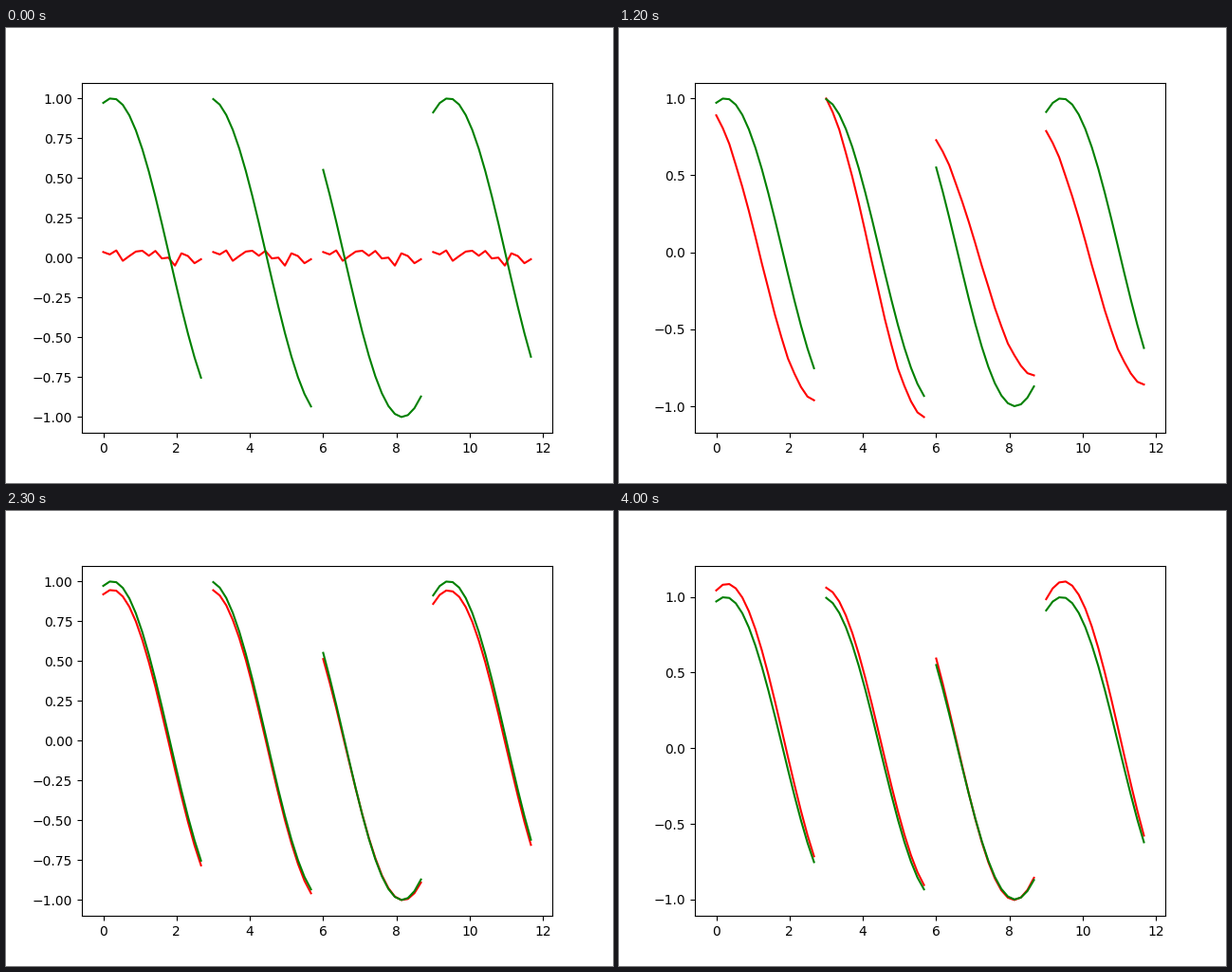
Animation, 640 px wide and 480 px high, one loop 4100 ms. Source, as a matplotlib script:

```python
import numpy as np
import matplotlib.pyplot as plt
from matplotlib.animation import FuncAnimation

FRAMES, INTERVAL = 41, 100
SPAN, POINTS = 8 / 3, 16

u = np.linspace(0, SPAN, POINTS)
starts = [0, 3, 6, 9]
phases = [-0.243, 0.107, 0.988, -0.425]

# Output of the untrained model: the same small noise in every window.
noise = np.array([.035, .02, .045, -.02, .01, .038, .043, .012,
                  .042, -.005, 0, -.05, .027, .01, -.035, -.01])

# Key points of the training: the slope of the wave is learnt first,
# its bow second; dip and lift are errors that fade out.
key_steps = [0, 4, 12, 15, 20, 27, 34, 40]
slope_keys = [1.08, 1.08, 1.07, 1.12, 1.035, .92, 1.0, 1.02]
bow_keys = [0, -.06, 0, .5, .92, 1.0, .97, 1.1]
dip_keys = [0, -.10, -.16, -.05, -.02, .06, -.04, .02]
lift_keys = [0, 0, 0, .08, -.07, 0, 0, .04]

falling = -np.sin(u - SPAN / 2)
arch = np.cos(u - SPAN / 2)


def prediction(step, phase):
    slope, bow, dip, lift = (
        np.interp(step, key_steps, keys)
        for keys in (slope_keys, bow_keys, dip_keys, lift_keys))
    slope *= 1 - np.exp(-1.2 * step)
    mid = phase + SPAN / 2
    wave = slope * np.sin(mid) * falling + (bow * np.cos(mid) + dip) * arch
    return wave + lift + noise * np.exp(-step / 6)


fig, ax = plt.subplots(figsize=(6.4, 4.8), dpi=100)
red_lines = []
for start, phase in zip(starts, phases):
    red_lines += ax.plot(start + u, prediction(0, phase), "r-")
    ax.plot(start + u, np.cos(u + phase), "g-")


def update(step):
    for line, phase in zip(red_lines, phases):
        line.set_ydata(prediction(step, phase))
    ax.relim()
    ax.autoscale_view()
    return red_lines


anim = FuncAnimation(fig, update, frames=FRAMES, interval=INTERVAL,
                     repeat=True, repeat_delay=0, blit=False)
plt.show()
```
